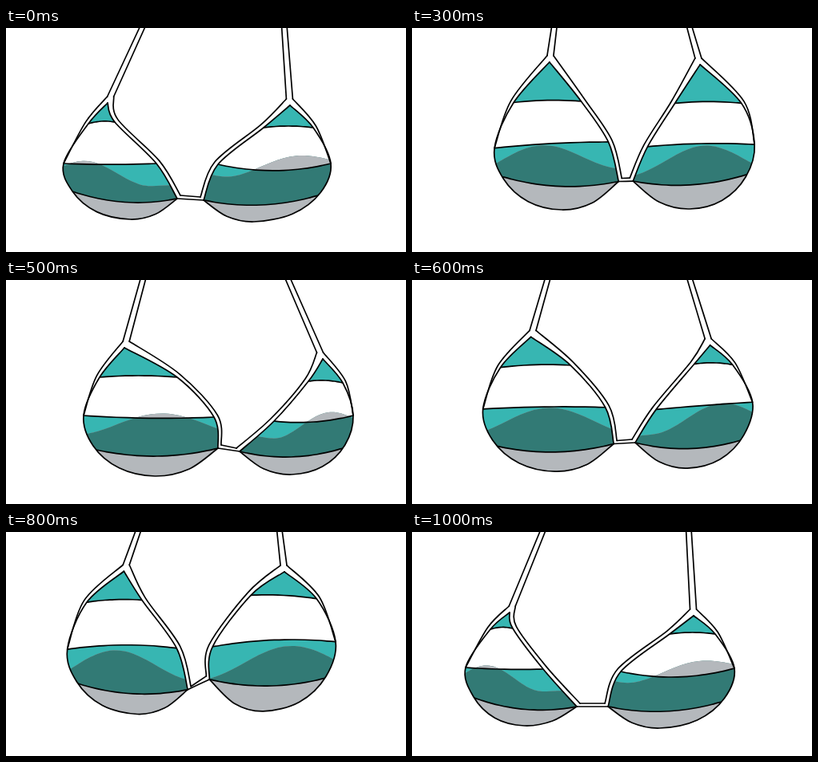
An HTML page with a canvas for the animation above (1.1 s loop, 500 px wide and 281 px high).

```html
<!DOCTYPE html>
<html lang="en">
<head>
<meta charset="utf-8">
<title>Bouncing bikini top</title>
<style>
html, body { margin: 0; width: 100%; height: 100%; overflow: hidden; background: #fff; }
canvas { display: block; }
</style>
</head>
<body>
<canvas id="stage" width="500" height="281"></canvas>
<script>
const ctx = document.getElementById('stage').getContext('2d');
const W = 500, H = 281, STEP = 100, STEPS = 11;
const TEAL = '#37b6b2', DARK = '#327a75', GRAY = '#b4b8bc', WHITE = '#fff';

// Key poses of each cup at these steps of the loop:
// strap x, hem y, shadow crest (0 to 1) and its drop below the middle stripe,
// then the points apex, shoulder, fold, side, inner, corner, bottom.
const keys = [0, 2, 4, 5, 7, 9, 10];
const left = [
  [167, 205, .23, -4, 127, 94, 103, 120, 136, 118, 72, 170, 188, 170, 214, 214, 155, 240],
  [186, 188, .30, 10, 176, 52, 126, 97, 208, 97, 99, 156, 237, 149, 247, 197, 178, 229],
  [161, 191, .52, -9, 159, 45, 124, 97, 207, 94, 103, 150, 250, 144, 266, 193, 193, 231],
  [168, 213, .60, -6, 148, 85, 117, 122, 214, 122, 97, 170, 260, 172, 265, 211, 186, 246],
  [163, 199, .47, 7, 150, 53, 105, 94, 180, 89, 81, 151, 221, 145, 238, 198, 172, 232],
  [161, 186, .38, 3, 141, 57, 98, 91, 158, 91, 73, 149, 203, 153, 217, 202, 155, 229],
  [160, 208, .28, -4, 122, 101, 98, 122, 126, 121, 67, 170, 164, 172, 206, 219, 140, 243]
];
const right = [
  [345, 210, .31, -17, 355, 97, 384, 125, 322, 125, 406, 170, 265, 171, 247, 216, 310, 243],
  [352, 195, .50, 10, 361, 53, 404, 100, 324, 98, 420, 156, 286, 156, 266, 198, 340, 234],
  [337, 179, .38, -9, 364, 52, 418, 97, 340, 99, 435, 142, 306, 148, 286, 192, 352, 224],
  [350, 211, .32, -10, 396, 99, 421, 129, 378, 127, 434, 170, 335, 177, 292, 215, 357, 244],
  [338, 187, .34, 7, 347, 58, 383, 82, 321, 82, 417, 135, 271, 145, 264, 190, 330, 226],
  [342, 187, .36, 3, 355, 55, 396, 97, 301, 89, 408, 149, 254, 151, 247, 188, 315, 229],
  [343, 213, .32, -18, 352, 105, 379, 128, 322, 128, 403, 171, 261, 175, 245, 219, 310, 246]
];

const mix = (a, b, u) => a + (b - a) * u;

// Cyclic Hermite interpolation between key poses.
function poseAt(rows, step) {
  const n = keys.length;
  const j = keys.findLastIndex(k => k <= step);
  const [p0, p1, p2, p3] = [-1, 0, 1, 2].map(d => rows[(j + d + n) % n]);
  const [t0, t1, t2, t3] = [-1, 0, 1, 2].map(d =>
    keys[(j + d + n) % n] + STEPS * Math.floor((j + d) / n));
  const span = t2 - t1, u = (step - t1) / span, h = u * u * (3 - 2 * u);
  const in1 = u * (1 - u) ** 2 * span / (t2 - t0);
  const in2 = u * u * (u - 1) * span / (t3 - t1);
  return p1.map((v, i) =>
    mix(v, p2[i], h) + in1 * (p2[i] - p0[i]) + in2 * (p3[i] - v));
}

// Adds a smooth curve through the points.
function trace(path, pts) {
  path.lineTo(...pts[0]);
  for (let i = 0; i < pts.length - 1; i++) {
    const a = pts[i], b = pts[i + 1], p = pts[i - 1] || a, q = pts[i + 2] || b;
    path.bezierCurveTo(
      a[0] + (b[0] - p[0]) / 6, a[1] + (b[1] - p[1]) / 6,
      b[0] - (q[0] - a[0]) / 6, b[1] - (q[1] - a[1]) / 6, ...b);
  }
  return path;
}

const line = pts => ctx.stroke(trace(new Path2D(), pts));

// A bowed line from a to b, as a function of u.
const bow = (a, b, sag) => u =>
  [mix(a[0], b[0], u), mix(a[1], b[1], u) + 4 * sag * u * (1 - u)];

const sample = (curve, end = 1) =>
  Array.from({ length: 13 }, (_, i) => curve(i / 12 * end)).sort((p, q) => p[0] - q[0]);

// Point i of a line, moved sideways by d.
function beside(pts, i, d) {
  const dx = pts[i + 1][0] - pts[i - 1][0], dy = pts[i + 1][1] - pts[i - 1][1];
  const k = d / Math.hypot(dx, dy);
  return [pts[i][0] + dy * k, pts[i][1] - dx * k];
}

function below(pts) {
  const path = new Path2D();
  path.moveTo(0, pts[0][1]);
  trace(path, pts);
  path.lineTo(W, pts.at(-1)[1]);
  path.lineTo(W, H);
  path.lineTo(0, H);
  return path;
}

function stripes(edges, color, pale) {
  ctx.fillStyle = color;
  ctx.fillRect(0, 0, W, H);
  edges.forEach((edge, i) => {
    ctx.fillStyle = i % 2 ? color : pale;
    ctx.fill(below(edge));
  });
}

// Draws a cup with its strap; dir is 1 for left, -1 for right.
// Returns the two points where the bridge is attached.
function drawCup([strapX, hem, crest, drop, ...coords], dir) {
  const [apex, shoulder, fold, side, inner, corner, bottom] =
    Array.from({ length: 7 }, (_, i) => coords.slice(2 * i, 2 * i + 2));
  const arc = s => [
    mix(bottom[0], side[0], Math.sqrt(1 - s * s)), mix(side[1], bottom[1], s)];
  const shelf = [mix(bottom[0], corner[0], .54), mix(bottom[1], corner[1], .25)];
  const outside = [apex, shoulder, side, arc(.5), arc(.866), bottom, shelf, corner];
  const inside = [apex, fold, inner, corner];

  const middle = bow(side, inner, -1 - .55 * drop);
  const hemEnd = arc((hem - side[1]) / (bottom[1] - side[1]));
  const edges = [bow(shoulder, fold, -2), middle, bow(hemEnd, corner, 9)].map(b => sample(b));
  const shadow = sample(u => {
    const [x, y] = middle(u);
    const away = Math.min(1, Math.abs(u - crest) / .72);
    return [x, y + drop + 16 * (1 - Math.cos(Math.PI * away))];
  }, 1.25);

  ctx.save();
  ctx.clip(trace(trace(new Path2D(), outside), [...inside].reverse()));
  stripes(edges, TEAL, WHITE);
  ctx.save();
  ctx.clip(below(shadow));
  stripes(edges, DARK, GRAY);
  ctx.restore();
  edges.forEach(line);
  ctx.restore();
  line(outside);
  line(inside);

  // Strap, narrowing just above the apex, and the trim along both edges.
  const neckX = mix(apex[0], strapX + 3, 8 / apex[1]), neckY = apex[1] - 8;
  const tie = [corner[0] + 4 * dir, corner[1] - 4];
  const outerNeck = [neckX - 4 * dir, neckY], innerNeck = [neckX + 4 * dir, neckY];
  line([[strapX + 3 - 3.3 * dir, 0], outerNeck]);
  line([[strapX + 3 + 3.3 * dir, 0], innerNeck]);
  line([outerNeck, beside(outside, 1, -4 * dir), side]);
  line([innerNeck, beside(inside, 1, 5 * dir), beside(inside, 2, 5 * dir), tie]);
  return [tie, corner];
}

function draw(step) {
  ctx.fillStyle = WHITE;
  ctx.fillRect(0, 0, W, H);
  const from = drawCup(poseAt(left, step), 1);
  const to = drawCup(poseAt(right, step), -1);
  from.forEach((p, i) => line([p, to[i]]));
}

ctx.lineWidth = 1.7;
ctx.lineCap = ctx.lineJoin = 'round';
const start = performance.now();
function tick() {
  draw(Math.floor((performance.now() - start) / STEP) % STEPS);
  requestAnimationFrame(tick);
}
tick();
</script>
</body>
</html>
```
